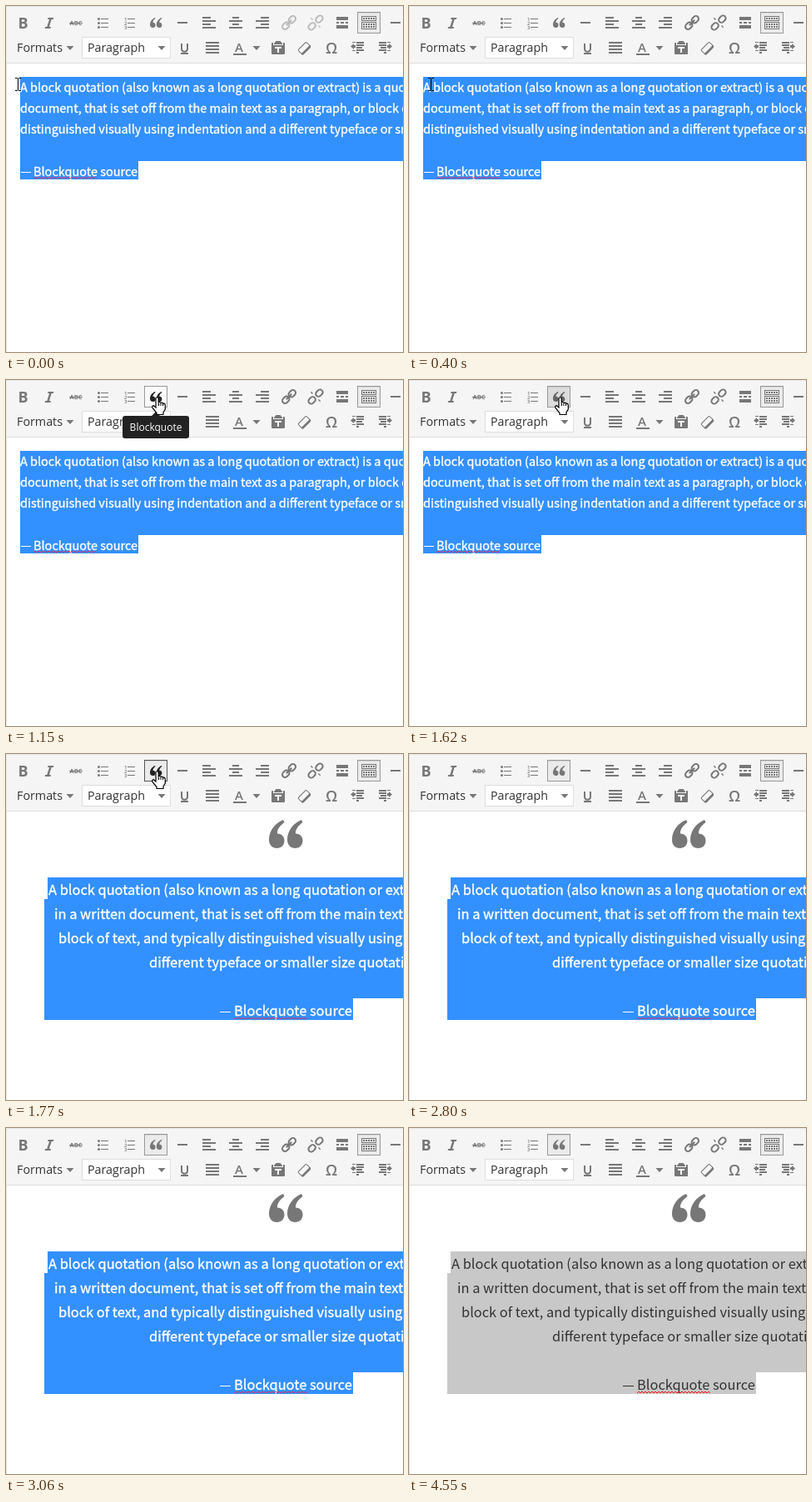
Recreate the animation shown at these times as an HTML page with a canvas. Size 477x415 px, loop 4.63 s.

```html
<!DOCTYPE html>
<html lang="en">
<head>
<meta charset="utf-8">
<title>Blockquote button</title>
<style>
html, body { margin: 0; width: 100%; height: 100%; overflow: hidden; background: #fff; }
canvas { display: block; }
</style>
</head>
<body>
<canvas id="stage" width="477" height="415"></canvas>
<script>
const ctx = document.getElementById('stage').getContext('2d');
const LOOP = 4630;
const ICON = '#777', BAR = '#f5f5f5', BLUE = '#3390ff';
const UI = '"Open Sans", sans-serif';
const BODY = '"Noto Sans CJK JP", "Noto Sans CJK SC", "Noto Sans CJK", "Open Sans", sans-serif';

// Mouse pointer: start time, shape, left, top
const POINTER = [
  [0, 'beam', 11, 86], [120, 'beam', 11, 85], [400, 'beam', 23, 86],
  [550, 'beam', 126, 86], [700, 'beam', 157, 63], [850, 'hand', 175, 42],
  [1010, 'hand', 175, 24], [1150, 'hand', 175, 20], [2800, 'tick', 271, 188],
  [2920, 'arrow', 370, 371], [3060, 'none', 0, 0]
];

// Quote button looks: start time, border, fill, icon
const QUOTE_BTN = [
  [0, '', '', ICON], [1010, '#999', '#fafafa', '#222'],
  [1620, '#999', '#dcdcdc', '#666'], [1770, '#555', '#ebebeb', '#222'],
  [2800, '#999', '#ebebeb', ICON]
];

const PLAIN = {
  size: 14.47, dash: [18, 199, 12], squiggle: [33, 110, 206],
  boxes: [[17, 85, 460, 101], [17, 186, 142, 22]],
  lines: [
    [17, 103, 'A block quotation (also known as a long quotation or extract) is a quotation'],
    [17, 128, 'document, that is set off from the main text as a paragraph, or block of text'],
    [17, 153, 'distinguished visually using indentation and a different typeface or smaller'],
    [33, 204, 'Blockquote source']
  ]
};
const QUOTED = {
  size: 16.42, dash: [257, 309, 13], squiggle: [274, 362, 317],
  boxes: [[50, 148, 427, 26], [46, 174, 431, 119], [46, 293, 371, 26]],
  lines: [
    [51, 169, 'A block quotation (also known as a long quotation or extract)'],
    [58, 198, 'in a written document, that is set off from the main text as'],
    [63, 227, 'block of text, and typically distinguished visually using indentation'],
    [172, 256, 'different typeface or smaller size quotation'],
    [274, 314, 'Blockquote source']
  ]
};

const current = (list, t) => list.filter(e => e[0] <= t).pop();

function rect(x, y, w, h, color) {
  if (color) ctx.fillStyle = color;
  ctx.fillRect(x, y, w, h);
}
function rounded(x, y, w, h, r, fill, stroke, width = 2) {
  ctx.beginPath();
  ctx.roundRect(x, y, w, h, r);
  if (fill) { ctx.fillStyle = fill; ctx.fill(); }
  if (stroke) { ctx.strokeStyle = stroke; ctx.lineWidth = width; ctx.stroke(); }
}
function text(str, x, y, font, color, align = 'left', weight = 0) {
  ctx.font = font;
  ctx.fillStyle = ctx.strokeStyle = color;
  ctx.textAlign = align;
  ctx.fillText(str, x, y);
  if (weight) {
    ctx.lineWidth = weight;
    ctx.strokeText(str, x, y);
  }
}
function frame(x, y, w, h, border, fill) {
  rect(x, y, w, h, border);
  rect(x + 1, y + 1, w - 2, h - 2, fill);
}
function poly(points, fill, stroke, width = 1) {
  ctx.beginPath();
  points.forEach(([x, y]) => ctx.lineTo(x, y));
  if (fill) { ctx.closePath(); ctx.fillStyle = fill; ctx.fill(); }
  if (stroke) { ctx.strokeStyle = stroke; ctx.lineWidth = width; ctx.stroke(); }
}
function at(x, y, draw, angle = 0, sx = 1, sy = sx) {
  ctx.save();
  ctx.translate(x, y);
  ctx.rotate(angle);
  ctx.scale(sx, sy);
  draw();
  ctx.restore();
}
function path(d, fill, stroke, width = 1) {
  const p = new Path2D(d);
  if (fill) { ctx.fillStyle = fill; ctx.fill(p); }
  if (stroke) { ctx.strokeStyle = stroke; ctx.lineWidth = width; ctx.stroke(p); }
}
const caret = (x, y) => poly([[x - 4.5, y - 2], [x + 4.5, y - 2], [x, y + 3]], ICON);

const MARK = 'M17 0C7 4 0 13 0 24C0 30 4 34 9.5 34C15 34 18.5 30 18.5 25C18.5 20 15 16.5 10 16.5C9.5 12 13 7 18.5 3Z';
function quoteMarks(x, y, scale, color) {
  for (const dx of [0, 22]) at(x + dx * scale, y, () => path(MARK, color), 0, scale);
}

function alignIcon(cx, cy, anchor, short) {
  for (let i = 0; i < 4; i++) {
    const w = i % 2 ? 16 : short;
    rect(cx - 8 + (16 - w) * anchor, cy - 7 + i * 4, w, 2, ICON);
  }
}
function listIcon(cx, cy, numbered) {
  for (let i = 0; i < 3; i++) {
    const y = cy - 5 + i * 5;
    if (numbered) text(i + 1, cx - 6, y + 2.5, `600 6px ${UI}`, ICON);
    else rounded(cx - 6, y - 1, 3, 3, 1.5, ICON);
    rect(cx - 2, y, 9, 1, ICON);
  }
}
function linkIcon(cx, cy, broken, color) {
  at(cx, cy, () => {
    const gap = broken ? 0.8 : 0;
    for (const x of [-10 - gap, 0.8 + gap]) rounded(x, -3.3, 9.2, 6.6, 3.3, '', color);
    if (broken) {
      for (const y of [-8, 5]) rect(-0.7, y, 1.4, 3, color);
    } else rect(-4.5, -1, 9, 2, color);
  }, -Math.PI / 4);
}
function indentIcon(cx, cy, dir) {
  at(cx, cy, () => {
    // Text lines beside the arrow; the second and last are shorter
    [9, 9, 7, 9, 3].forEach((w, i) => rect(-2, -7 + i * 3, w, 2, ICON));
    for (const y of [-7, 3]) rect(-7, y, 4, 1);
    poly([[-9, -1.5], [-5, -5], [-5, -3], [-3, -3], [-3, 0], [-5, 0], [-5, 2]], ICON);
  }, 0, -dir, 1);
}
function keyboardIcon(x, y) {
  frame(x, y, 18, 6, ICON, '#ebebeb');
  frame(x, y + 7, 18, 9, ICON, '#ebebeb');
  for (const dy of [2, 9, 12]) {
    for (let i = 0; i < 5; i++) rect(x + 2 + i * 3, y + dy, 2, 2, ICON);
  }
}

function topRow(t) {
  text('B', 20.5, 27, `bold 18px ${UI}`, ICON, 'center');
  path('M50.700 14h6.700l-.6 2h-2.100l-2.800 9h2.100l-.6 2h-6.800l.6-2h2.100l2.800-9H50Z', ICON);
  text('ABC', 84, 23, `bold 7.500px ${UI}`, ICON, 'center');
  rect(76, 20, 16, 1, ICON);
  listIcon(116, 20, false);
  listIcon(148, 20, true);

  const [, border, fill, color] = current(QUOTE_BTN, t);
  if (border) {
    frame(166, 7, 28, 26, border, fill);
    if (t >= 1620) rect(167, 8, 26, 1, 'rgba(0,0,0,.1)');
  }
  quoteMarks(173, 14, 0.355, color);

  rect(206, 19, 12, 2, ICON);
  alignIcon(244, 20, 0, 10);
  alignIcon(276, 20, 0.5, 8);
  alignIcon(308, 20, 1, 10);
  const linkColor = t < 400 ? '#bbb' : ICON;
  linkIcon(340, 20, false, linkColor);
  linkIcon(372, 20, true, linkColor);

  for (const y of [13, 23]) rect(397, y, 14, 4, ICON);
  for (const [x, w] of [[397, 3], [402, 4], [408, 3]]) rect(x, 19, w, 2);

  frame(422, 7, 28, 26, '#999', '#ebebeb');
  rect(423, 8, 26, 1, 'rgba(0,0,0,.1)');
  keyboardIcon(427, 12);
  rect(462, 19, 12, 2, ICON);
}

function bottomRow(t) {
  text('Formats', 13, 55, `14.3px ${UI}`, '#333');
  caret(77, 50);
  const hover = t >= 850 && t < 1010;
  frame(91, 37, 107, 26, hover ? '#b4b9be' : '#ddd', '#fff');
  text('Paragraph', 98, 55, `14.3px ${UI}`, '#333');
  caret(187, 50);

  path('M211 45v6c0 5 7 5 7 0v-6', '', ICON, 2);
  rect(210, 56, 9, 2, ICON);
  alignIcon(248, 50, 0, 16);
  text('A', 280, 55, `600 15px ${UI}`, ICON, 'center');
  rect(273, 57, 16, 2, ICON);
  caret(301, 50);

  rounded(319, 44, 16, 14, 1, ICON);
  rect(321, 44, 12, 3, BAR);
  poly([[324.5, 42], [329.5, 42], [332, 45], [332, 46], [322, 46], [322, 45]], ICON);
  rect(323, 49, 8, 2, BAR);
  rect(326, 51, 2, 5);

  at(358.5, 50.8, () => {
    rounded(-7.5, -4.6, 15, 9.2, 2, ICON);
    rounded(-6.5, -3.5, 13, 5.4, 1, BAR);
  }, -Math.PI / 4);
  text('Ω', 391, 57, `600 18px ${UI}`, ICON, 'center');
  indentIcon(423, 50, -1);
  indentIcon(455, 50, 1);
}

function toolbar(t) {
  rect(0, 0, 477, 69, BAR);
  rect(0, 0, 477, 1, '#e5e5e5');
  rect(0, 68, 477, 1, '#dedede');
  rect(0, 0, 1, 415, '#e5e5e5');
  topRow(t);
  bottomRow(t);
}

function passage({ size, dash, squiggle, boxes, lines }, focused) {
  const ink = focused ? '#fff' : '#333';
  for (const b of boxes) rect(...b, focused ? BLUE : '#c8c8c8');
  for (const [x, y, str] of lines) {
    text(str, x, y, `${size}px ${BODY}`, ink, 'left', focused ? 0.35 : 0);
  }
  rect(dash[0], dash[1], dash[2], 1, ink);
  const [from, to, y] = squiggle;
  const wave = [];
  for (let x = from; x <= to; x += 2) wave.push([x, y + ((x - from) % 4 ? -1 : 1)]);
  poly(wave, '', focused ? '#d0306a' : '#f00', 1);
}

function tooltip() {
  rounded(140, 43, 80, 27, 3, '#222');
  poly([[180, 38], [185, 43], [175, 43]], '#222');
  text('Blockquote', 180, 61, `12px ${UI}`, '#fff', 'center');
}

const SHAPES = {
  none() {},
  beam() {
    for (const y of [0, 15]) {
      rect(0, y, 3, 1, '#000');
      rect(4, y, 3, 1);
    }
    rect(3, 1, 1, 14);
  },
  tick() { poly([[0.5, 3], [3, 1], [5.5, 3]], '', '#333'); },
  hand() {
    path('M5 2Q6.500-.5 8.200 2V7Q9.800 5.700 11 7.500Q12.600 6.500 13.700 8.300Q15.600 7.600 16.300 10V15L14 19V21.500H6V19.500L1 13.500Q0 11 2.300 10.700L5 13Z', '#fff', '#000', 1.2);
    for (const x of [8, 10.5, 13]) rect(x, 8, 1, 3, '#000');
  },
  arrow() {
    poly([[0.5, 1], [0.5, 17], [4, 13.5], [6.5, 19.5], [9, 18.5], [6.5, 12.5], [11.5, 12.5], [0.5, 1]], '#fff', '#000');
  }
};

function draw(t) {
  rect(0, 0, 477, 415, '#fff');
  toolbar(t);
  if (t < 1770) passage(PLAIN, true);
  else {
    quoteMarks(316, 79, 1, ICON);
    passage(QUOTED, t < 4550);
  }
  if (t >= 1010 && t < 1620) tooltip();
  const [, shape, x, y] = current(POINTER, t);
  at(x, y, SHAPES[shape]);
}

function tick() {
  draw(performance.now() % LOOP);
  requestAnimationFrame(tick);
}
tick();
</script>
</body>
</html>
```
